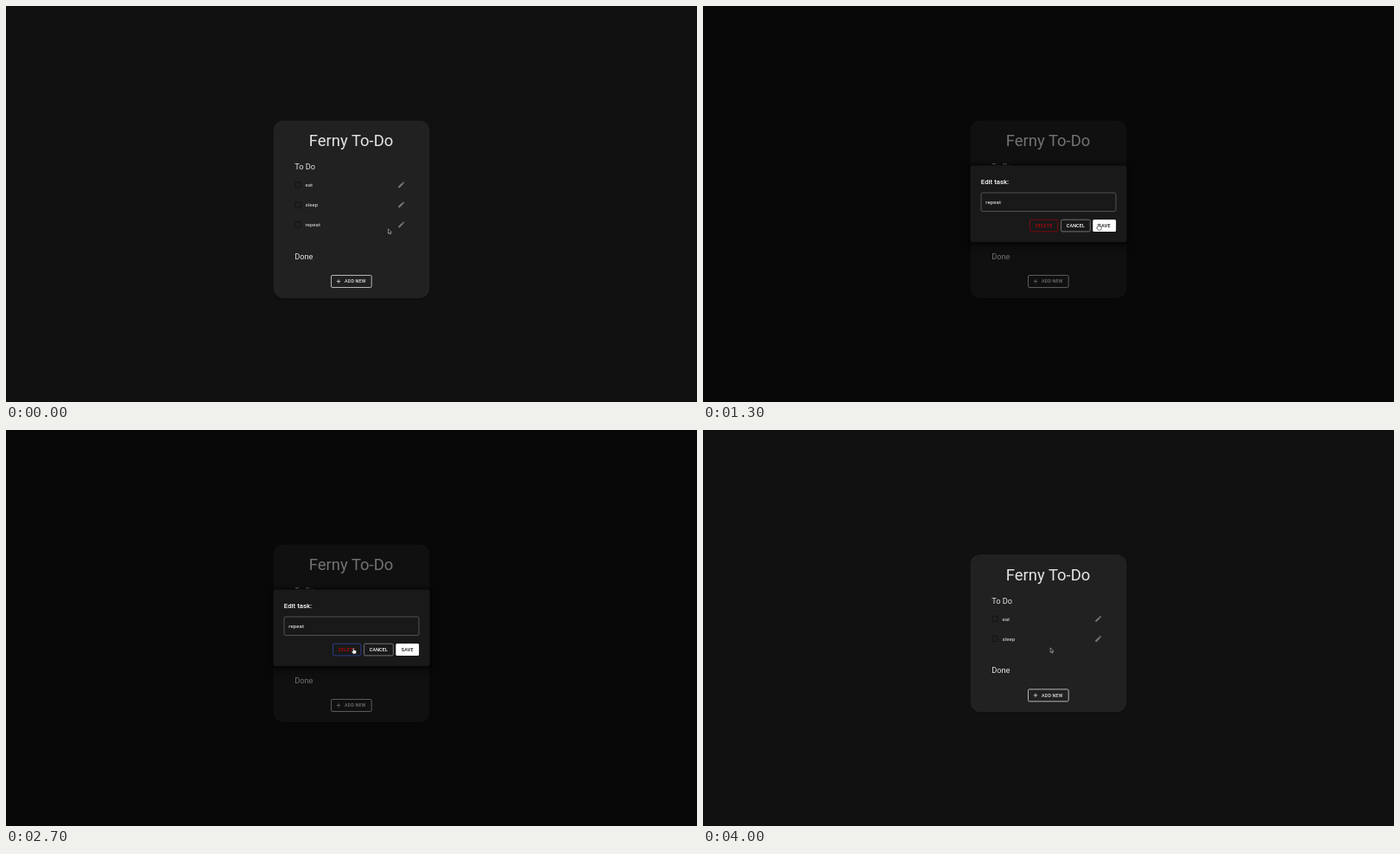
Recreate the animation shown at these times as an HTML page. Size 800x458 px, loop 4.6 s.

```html
<!DOCTYPE html>
<html lang="en">
<head>
<meta charset="utf-8">
<title>To-do list</title>
<style>
  html, body { margin: 0; width: 100%; height: 100%; overflow: hidden; background: #111; }
  svg { display: block; width: 100%; height: 100%; font-family: Roboto, sans-serif; }
  text { fill: #e4e4e4; }
  .title { font-size: 18.46px; text-anchor: middle; }
  .heading { font-size: 9.23px; }
  .task { font-size: 6.15px; letter-spacing: .00938em; }
  .label { font-size: 5.385px; font-weight: 500; letter-spacing: .02857em; }
  .mid { text-anchor: middle; }
  .prompt { font-size: 7.69px; font-weight: 500; letter-spacing: .0075em; fill: #fff; }
  .line { stroke: #282828; stroke-width: .6; }
</style>
</head>
<body>
<svg viewBox="0 0 800 458">
  <defs>
    <filter id="soft" x="-20%" y="-30%" width="140%" height="160%"><feGaussianBlur stdDeviation="5"/></filter>
    <filter id="slight"><feGaussianBlur stdDeviation="1.2"/></filter>
    <path id="pencil" transform="scale(.3846) translate(-12 -12)" fill="#7a7a7a"
      d="M3 17.25V21h3.75L17.81 9.94l-3.75-3.75L3 17.25zM20.71 7.04c.39-.39.39-1.02 0-1.41l-2.34-2.34c-.39-.39-1.02-.39-1.41 0l-1.83 1.83 3.75 3.75 1.83-1.83z"/>
  </defs>
  <rect width="800" height="458" fill="#111"/>

  <rect id="cardShadow" x="310" width="180.5" rx="11.5" opacity=".35" filter="url(#slight)"/>
  <rect id="card" x="309.5" width="181" rx="11.5" fill="#212121"/>
  <g id="upper">
    <text class="title" x="399.6" y="162.1">Ferny To-Do</text>
    <text class="heading" x="334.2" y="189">To Do</text>
    <g id="rows"></g>
  </g>
  <g id="lower">
    <text class="heading" x="334.2" y="292.5">Done</text>
    <rect x="376.5" y="311.5" width="46.7" height="14" rx="1.5" fill="none" stroke="#c8c8c8" stroke-width=".9"/>
    <path d="M385 316.2v4.5M382.75 318.45h4.5" stroke="#e4e4e4" stroke-width=".75"/>
    <text class="label" x="392" y="320.4">ADD NEW</text>
  </g>
  <circle id="ring" cx="457.7" cy="252.9" r="8.7" fill="none" stroke="#1f6aa8" stroke-width="1.2"/>

  <g id="modal">
    <rect width="800" height="458" opacity=".5"/>
    <rect x="308" y="186" width="184" height="92" rx="4" opacity=".5" filter="url(#soft)"/>
    <rect x="309" y="183.3" width="182" height="91.6" rx="4" opacity=".55" filter="url(#slight)"/>
    <rect x="309.4" y="184.5" width="181.4" height="88.8" rx="3.5" fill="#191919"/>
    <text class="prompt" x="321.8" y="206">Edit task:</text>
    <rect x="322" y="216" width="156" height="21.5" rx="1.6" fill="none" stroke="#606060" stroke-width=".8"/>
    <text class="task" x="327.3" y="228.7" style="fill:#fff">repeat</text>
    <rect id="halo" x="377.9" y="246.6" width="33.6" height="14.9" rx="2" fill="#141a2c" stroke="#1f4f92" stroke-width="1.7"/>
    <rect id="deleteBox" x="378.5" y="247.2" width="32.4" height="13.7" rx="1.5" fill="none" stroke-width=".85"/>
    <text class="label mid" x="394.8" y="255.9" style="fill:#b3080c">DELETE</text>
    <rect id="cancelBox" x="414.6" y="247.2" width="33.7" height="13.7" rx="1.5" stroke-width=".85"/>
    <text class="label mid" x="431.4" y="255.9" style="fill:#fff">CANCEL</text>
    <rect x="451.3" y="247" width="26.8" height="14" rx="1.5" fill="#fff"/>
    <text class="label mid" x="464.7" y="255.9" style="fill:#111">SAVE</text>
  </g>

  <g id="pointer">
    <path id="arrow" fill="#111" stroke="#d8d8d8" stroke-width=".55"
      d="M0 0V5.4L1.3 4.3 2.1 6.2 3 5.8 2.2 4H3.9Z"/>
    <path id="hand" fill="#fff" stroke="#000" stroke-width=".5"
      d="M-.8.7a.7.7 0 0 1 1.4 0V2.6L2.9 3.1Q3.7 3.4 3.5 4.5L2.9 7H-.4L-2 4.7Q-2.3 3.8-1.4 3.8L-.8 4.3Z"/>
  </g>
</svg>
<script>
const LOOP = 4600, STEP = 100, REMOVED = 4000, SHIFT = 11.6;
const $ = id => document.getElementById(id);
const set = (id, attrs) => Object.entries(attrs).forEach(([k, v]) => $(id).setAttribute(k, v));
const show = (id, on) => set(id, { visibility: on ? "visible" : "hidden" });
const clamp = v => Math.max(0, Math.min(1, v));
const ease = v => v * v * (3 - 2 * v);

$("rows").innerHTML = ["eat", "sleep", "repeat"].map((task, i) => `
  <g id="row${i}" transform="translate(0 ${206.8 + i * 23.05})">
    <path class="line" d="M334 -11.6H466"/>
    <rect x="335" y="-3.1" width="6.2" height="6.2" rx=".5" fill="none" stroke="#111" stroke-width=".8"/>
    <text class="task" x="346.4" y="2.1">${task}</text>
    <use href="#pencil" x="457.7"/>
  </g>`).join("");

// Each leg: start, end, destination x, y
const legs = [
  [0, 500, 457.8, 252.2],
  [1500, 2100, 430, 249.5],
  [2100, 2700, 402.2, 251.9]
];

function pointerAt(t) {
  let x = 442.5, y = 257.8;
  for (const [start, end, toX, toY] of legs) {
    const k = ease(clamp((t - start) / (end - start)));
    x += (toX - x) * k;
    y += (toY - y) * k;
  }
  return [x, y];
}

function draw(time) {
  const t = Math.floor((time % LOOP) / STEP) * STEP;
  const removed = t >= REMOVED;
  const alpha = removed ? 0 : ease(clamp((t - 800) / 300));
  const open = alpha > 0;
  const [x, y] = pointerAt(t);
  const over = (left, right) => open && x >= left && x <= right;
  const onDelete = over(378, 411), onCancel = over(414, 448.5), onSave = over(451, 478);
  const onPencil = !open && !removed && Math.hypot(x - 457.7, y - 252.9) < 9.2;
  const hand = onDelete || onCancel || onSave || onPencil;

  const shift = removed ? SHIFT : 0;
  const top = 132.4 + shift, height = 205.5 - 2 * shift;
  set("card", { y: top, height });
  set("cardShadow", { y: top + 1, height });
  set("upper", { transform: `translate(0 ${shift})` });
  set("lower", { transform: `translate(0 ${-shift})` });
  show("row2", !removed);
  show("ring", t >= 700 && t < 1100);

  set("modal", { opacity: alpha });
  show("halo", t === 3900);
  set("deleteBox", { stroke: onDelete ? "#3242a0" : "#8c080c" });
  set("cancelBox", { stroke: onCancel ? "#727674" : "#828282", fill: onCancel ? "#1d1e1e" : "#191919" });

  set("pointer", { transform: `translate(${x} ${y})` });
  show("hand", hand);
  show("arrow", !hand);
}

const began = performance.now();
function tick() {
  draw(performance.now() - began);
  requestAnimationFrame(tick);
}
tick();
</script>
</body>
</html>
```
